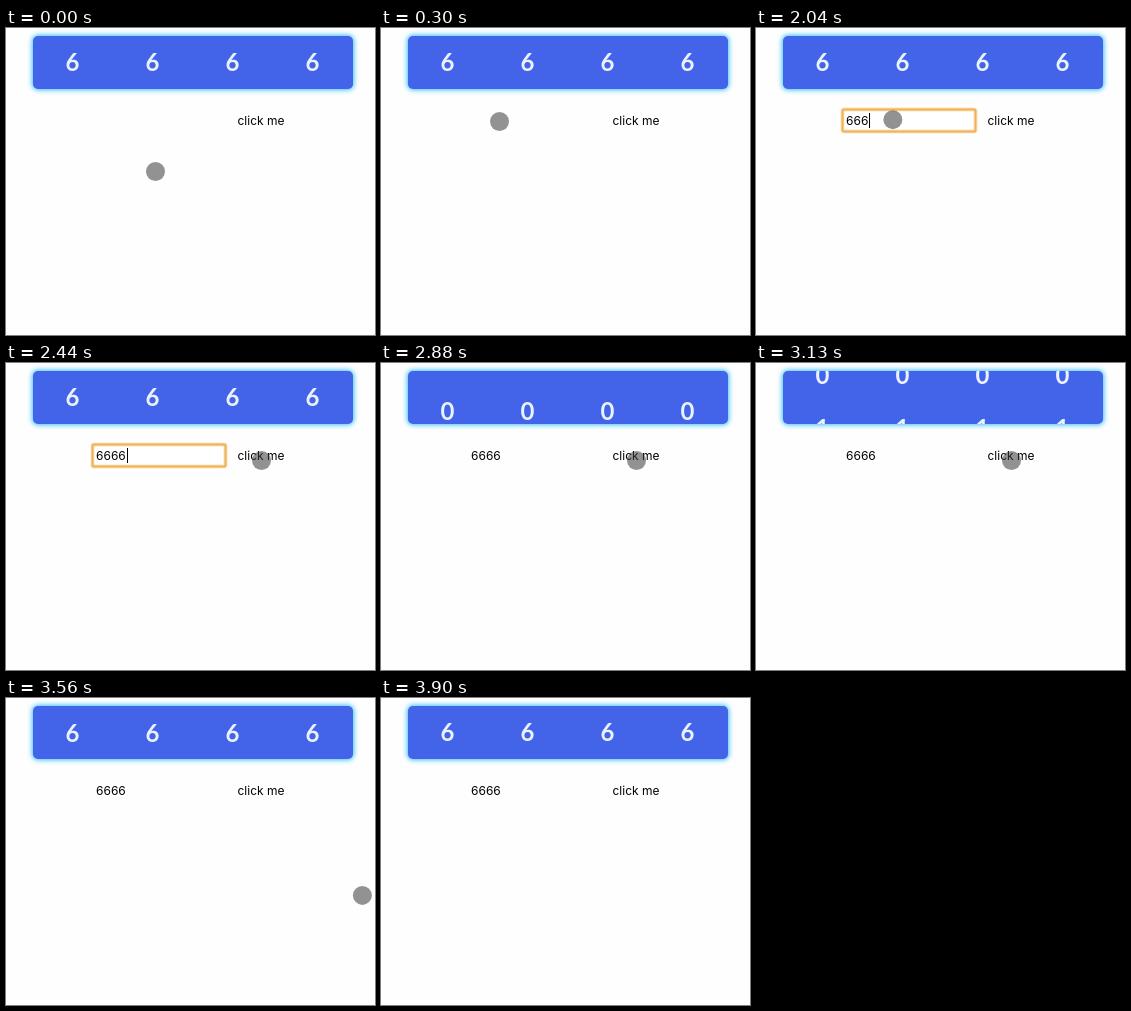
Recreate the animation shown at these times as an HTML page. Size 369 by 307 pixels, loop 4540 ms.

```html
<!DOCTYPE html>
<html lang="en">
<head>
<meta charset="utf-8">
<title>Rolling digits</title>
<style>
  html, body { margin: 0; width: 100%; height: 100%; overflow: hidden; background: #fefefe; }
  svg { display: block; width: 369px; height: 307px; }
  .label { font: 12px Inter, sans-serif; fill: #000; }
  .digit { font: 700 24px Lato, sans-serif; fill: #eaf2ff; text-anchor: middle; }
</style>
</head>
<body>
<svg viewBox="0 0 369 307">
  <defs>
    <clipPath id="window"><rect x="27" y="8" width="320" height="53" rx="5"/></clipPath>
    <filter id="glow" x="-10%" y="-50%" width="120%" height="200%"><feGaussianBlur stdDeviation="2.6"/></filter>
  </defs>
  <rect x="26" y="7" width="322" height="55" rx="6" fill="#35bfff" filter="url(#glow)"/>
  <rect x="27" y="8" width="320" height="53" rx="5" fill="#4363e9"/>
  <g clip-path="url(#window)"><g id="strip"></g></g>
  <g id="focus" fill="none">
    <rect x="86.5" y="81.5" width="133" height="22" rx="2" fill="#fff" stroke="#f6c984" stroke-width="4" stroke-opacity=".55"/>
    <rect x="86.5" y="81.5" width="133" height="22" rx="1.5" stroke="#efb259" stroke-width="2"/>
  </g>
  <text id="value" class="label" x="90" y="97"></text>
  <rect id="caret" y="85" width="1" height="15"/>
  <text class="label" x="231.5" y="97">click me</text>
  <circle id="pointer" r="9.5" fill="#3c3c3c" fill-opacity=".56"/>
</svg>
<script>
const LOOP = 4540;
const ROW = 53;
const TARGET = 6;
const FOCUS = 510, BLINK = 960, CLICK = 2650, ROLL = 1000;
const KEYS = [1460, 1700, 1930, 2170];

// Each move: [time, x, y] points
const MOVES = [
  [[0, 149.5, 143.5], [300, 118.5, 93.5]],
  [[1945, 118.5, 93.5], [2060, 143, 92], [2180, 196, 102], [2290, 241, 110],
   [2370, 257, 105], [2440, 255.5, 97.5]],
  [[3130, 255.5, 97.5], [3240, 263, 103], [3360, 286.5, 125.5], [3480, 327, 169],
   [3560, 356, 197], [3620, 381, 222]],
  [[3740, 382, 285], [3800, 355, 290], [3840, 347.5, 298], [3900, 354, 318]]
];

const $ = id => document.getElementById(id);
const show = (el, on) => el.setAttribute('visibility', on ? 'visible' : 'hidden');
const [strip, focusRing, value, caret, pointer] =
  ['strip', 'focus', 'value', 'caret', 'pointer'].map($);

for (let col = 0; col < 4; col++) {
  for (let n = 0; n < 10; n++) {
    const el = document.createElementNS('http://www.w3.org/2000/svg', 'text');
    el.setAttribute('class', 'digit');
    el.setAttribute('x', 66.5 + 80 * col);
    el.setAttribute('y', 42.5 + ROW * n);
    el.textContent = n;
    strip.append(el);
  }
}

function bezier(x1, y1, x2, y2) {
  const at = (a, b, u) => 3 * u * (1 - u) ** 2 * a + 3 * u * u * (1 - u) * b + u ** 3;
  return x => {
    if (x <= 0) return 0;
    if (x >= 1) return 1;
    let lo = 0, hi = 1;
    for (let i = 0; i < 30; i++) {
      const mid = (lo + hi) / 2;
      if (at(x1, x2, mid) < x) lo = mid; else hi = mid;
    }
    return at(y1, y2, lo);
  };
}
const rollEase = bezier(1, -0.3, 0.11, 1);

// Smooth curve through timed points, at rest at both ends
function along(pts, t) {
  const last = pts.length - 1;
  if (t <= pts[0][0]) return pts[0].slice(1);
  if (t >= pts[last][0]) return pts[last].slice(1);
  const i = pts.findIndex(p => p[0] > t) - 1;
  const a = pts[i], b = pts[i + 1], d = b[0] - a[0], s = (t - a[0]) / d;
  const slope = (k, c) => k === 0 || k === last ? 0
    : (pts[k + 1][c] - pts[k - 1][c]) / (pts[k + 1][0] - pts[k - 1][0]);
  return [1, 2].map(c => {
    const ease = s * s * (3 - 2 * s);
    return a[c] + (b[c] - a[c]) * ease
      + d * s * (1 - s) * ((1 - s) * slope(i, c) - s * slope(i + 1, c));
  });
}

function draw(t) {
  const progress = t < CLICK ? 1 : rollEase((t - CLICK) / ROLL);
  strip.setAttribute('transform', `translate(0 ${-TARGET * ROW * progress})`);

  const typed = KEYS.filter(k => t >= k).length;
  const focused = t >= FOCUS && t < CLICK;
  value.textContent = String(TARGET).repeat(typed);
  caret.setAttribute('x', Math.round(90 + 7.65 * typed));
  show(focusRing, focused);
  show(caret, focused && (t < BLINK || typed > 0));

  const move = MOVES.filter(m => t >= m[0][0]).pop();
  const [x, y] = along(move, t);
  pointer.setAttribute('cx', x);
  pointer.setAttribute('cy', y);
}

const start = performance.now();
function tick() {
  draw((performance.now() - start) % LOOP);
  requestAnimationFrame(tick);
}
tick();
</script>
</body>
</html>
```
